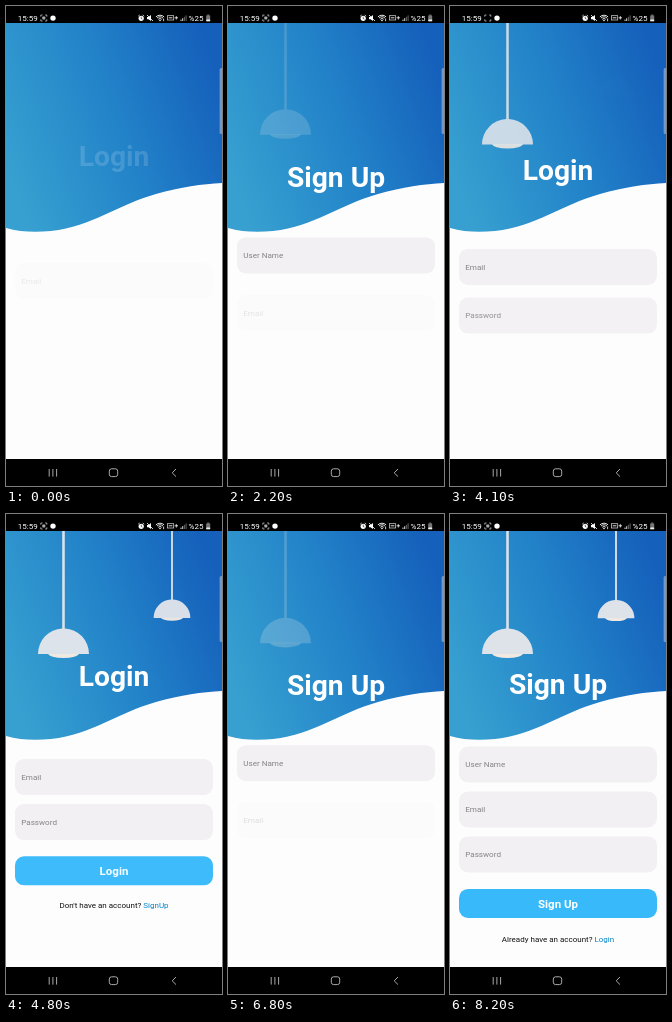
An HTML page with a canvas for the animation above (8.3 s loop, 216 by 480 pixels).

```html
<!DOCTYPE html>
<html lang="en">
<head>
<meta charset="utf-8">
<title>Login and sign up</title>
<style>
  html, body { margin: 0; width: 100%; height: 100%; overflow: hidden; background: #000; }
  canvas { display: block; width: 216px; height: 480px; }
</style>
</head>
<body>
<canvas id="stage"></canvas>
<script>
const W = 216, H = 480, LOOP = 8300, STEP = 100;
const FONT = 'Roboto, Arial, sans-serif';
const canvas = document.getElementById('stage');
const dpr = window.devicePixelRatio || 1;
canvas.width = W * dpr;
canvas.height = H * dpr;
const ctx = canvas.getContext('2d');
ctx.scale(dpr, dpr);

const PAGES = {
  login: {
    title: 'Login', titleY: 172, fieldTop: 245, fields: ['Email', 'Password'],
    buttonTop: 342, noteY: 395.3, note: "Don't have an account? ", link: 'SignUp'
  },
  signUp: {
    title: 'Sign Up', titleY: 180, fieldTop: 232.5, fields: ['User Name', 'Email', 'Password'],
    buttonTop: 375, noteY: 428.3, note: 'Already have an account? ', link: 'Login'
  }
};

// When each page is shown and when its entrance begins
const VISITS = [
  { shown: 0, start: -62, page: PAGES.login },
  { shown: 1900, start: 1930, page: PAGES.signUp },
  { shown: 3700, start: 3690, page: PAGES.login },
  { shown: 6500, start: 6520, page: PAGES.signUp }
];

// Underdamped spring: stiffness 100, damping 10, mass 1
function spring(ms) {
  if (ms <= 0) return 0;
  const t = ms / 1000, a = Math.sqrt(75) * t;
  return 1 - Math.exp(-5 * t) * (Math.cos(a) + Math.sin(a) * 5 / Math.sqrt(75));
}

// Fade in while sliding; dir -1 comes from above, 1 from below
function enter(ms, dir, draw) {
  const x = spring(ms);
  if (x <= 0) return;
  ctx.save();
  ctx.globalAlpha = Math.min(1, x);
  ctx.translate(0, dir * 14 * (1 - x));
  draw();
  ctx.restore();
}

function text(str, x, y, size, color, weight = 400, align = 'left') {
  ctx.font = `${weight} ${size}px ${FONT}`;
  ctx.fillStyle = color;
  ctx.textAlign = align;
  ctx.fillText(str, x, y);
}

function box(x, y, w, h, r, color) {
  ctx.fillStyle = color;
  ctx.beginPath();
  ctx.roundRect(x, y, w, h, r);
  ctx.fill();
}

function disc(x, y, r, color) {
  ctx.fillStyle = color;
  ctx.beginPath();
  ctx.arc(x, y, r, 0, Math.PI * 2);
  ctx.fill();
}

function line(points, color = '#fff', width = 0.8) {
  ctx.strokeStyle = color;
  ctx.lineWidth = width;
  ctx.beginPath();
  points.forEach(([x, y], i) => i ? ctx.lineTo(x, y) : ctx.moveTo(x, y));
  ctx.stroke();
}

function shape(points, color) {
  ctx.fillStyle = color;
  ctx.beginPath();
  points.forEach(([x, y]) => ctx.lineTo(x, y));
  ctx.fill();
}

function background() {
  ctx.fillStyle = '#fefdfe';
  ctx.fillRect(0, 0, W, H);
  const g = ctx.createLinearGradient(0, 160, 216, 80);
  g.addColorStop(0, '#37a0d0');
  g.addColorStop(0.5, '#2384c9');
  g.addColorStop(1, '#1560bb');
  ctx.fillStyle = g;
  ctx.beginPath();
  ctx.moveTo(0, 17);
  ctx.lineTo(0, 222);
  ctx.bezierCurveTo(14, 226, 29, 226.5, 45, 225);
  ctx.bezierCurveTo(87, 220, 111, 199, 150, 188);
  ctx.bezierCurveTo(175, 181, 196, 178, 216, 177);
  ctx.lineTo(216, 17);
  ctx.fill();
}

function lamp(x, y, r) {
  const cord = r * 0.1;
  ctx.fillStyle = '#f0e9e2';
  ctx.beginPath();
  ctx.ellipse(x, y - 0.5, r * 0.6, r * 0.18, 0, 0, Math.PI);
  ctx.fill();
  // One path, so cord and dome fade as a single piece
  ctx.fillStyle = '#dee3ea';
  ctx.beginPath();
  ctx.moveTo(x - cord / 2, -20);
  ctx.lineTo(x - cord / 2, y - r);
  ctx.arc(x, y, r, -Math.PI / 2 - 0.05, -Math.PI, true);
  ctx.lineTo(x + r, y);
  ctx.arc(x, y, r, 0, -Math.PI / 2 + 0.05, true);
  ctx.lineTo(x + cord / 2, -20);
  ctx.fill();
}

function drawPage(page, ms) {
  enter(ms - 200, -1, () => lamp(57.5, 140, 25.5));
  enter(ms - 400, -1, () => lamp(166, 104.3, 18.4));
  enter(ms, -1, () => text(page.title, 108, page.titleY, 28.2, '#fff', 700, 'center'));

  page.fields.forEach((label, i) => enter(ms - i * 200, 1, () => {
    const y = page.fieldTop + i * 45;
    box(9, y, 198, 36, 9, '#f2f0f2');
    text(label, 15.2, y + 20.9, 8.1, '#858486');
  }));

  const wait = page.fields.length * 200;
  enter(ms - wait, 1, () => {
    box(9, page.buttonTop, 198, 29, 9, '#38bafa');
    text(page.link === 'SignUp' ? 'Login' : 'Sign Up', 108, page.buttonTop + 18.7, 11.5, '#fff', 700, 'center');
  });
  enter(ms - wait - 200, 1, () => {
    ctx.font = `400 8px ${FONT}`;
    const noteW = ctx.measureText(page.note).width;
    const left = 108 - (noteW + ctx.measureText(page.link).width) / 2;
    text(page.note, left, page.noteY, 8, '#111');
    text(page.link, left + noteW, page.noteY, 8, '#0284c7');
  });
}

function arcLine(x, y, r, from, to, color, width) {
  ctx.strokeStyle = color;
  ctx.lineWidth = width;
  ctx.beginPath();
  ctx.arc(x, y, r, from, to);
  ctx.stroke();
}

function statusBar(ms) {
  ctx.fillStyle = '#000';
  ctx.fillRect(0, 0, W, 17);
  text('15:59', 11.7, 14.8, 8, '#fff');

  // Capture corners with a blinking centre
  for (const sx of [-1, 1]) for (const sy of [-1, 1]) {
    const x = 37.8 + sx * 3, y = 12 + sy * 3;
    line([[x - sx * 1.7, y], [x, y], [x, y - sy * 1.7]], '#ddd', 0.7);
  }
  if (ms % 1600 < 800) box(36.3, 10.6, 3, 2.8, 0.6, '#aaa');
  disc(47, 12.1, 2.7, '#fff');

  // Alarm
  disc(135.2, 12.3, 2.6, '#fff');
  line([[135.2, 10.7], [135.2, 12.5], [136.4, 13.1]], '#000', 0.6);
  line([[132.2, 10.2], [133.7, 9]]);
  line([[136.7, 9], [138.2, 10.2]]);

  // Muted speaker
  shape([[141, 10.9], [142.5, 10.9], [145, 9], [145, 15], [142.5, 13.2], [141, 13.2]], '#fff');
  line([[141, 9], [147, 15]]);

  // Wi-Fi
  for (const r of [2.4, 4.2, 5.8]) arcLine(154, 15, r, -Math.PI * 0.75, -Math.PI * 0.25, '#fff', 0.9);
  disc(154, 14.5, 0.8, '#fff');
  line([[157.6, 12.5], [157.6, 15.2]], '#fff', 0.8);

  // Call badge
  ctx.strokeStyle = '#ddd';
  ctx.lineWidth = 0.7;
  ctx.strokeRect(161.4, 9.7, 6.3, 4.3);
  line([[162.7, 11.8], [166.4, 11.8]], '#ddd', 1);
  line([[168.6, 11.8], [172, 11.8]], '#fff', 0.8);
  line([[170.3, 10.1], [170.3, 13.5]], '#fff', 0.8);

  for (let i = 0; i < 4; i++) {
    ctx.fillStyle = i < 2 ? '#ddd' : '#666';
    ctx.fillRect(174.5 + i * 1.7, 13.6 - i * 1.4, 1, 1.4 + i * 1.4);
  }
  text('%25', 182.6, 14.8, 8, '#fff');
  box(200.2, 9.3, 4, 6, 0.8, '#777');
  box(201.3, 8.5, 1.8, 1, 0.2, '#777');
  box(200.2, 13.4, 4, 1.9, 0.6, '#eee');
}

function navBar() {
  ctx.fillStyle = '#000';
  ctx.fillRect(0, 453, W, 27);
  for (const x of [43.2, 46.9, 50.6]) line([[x, 463], [x, 470.6]], '#bbb', 0.9);
  ctx.strokeStyle = '#bbb';
  ctx.lineWidth = 0.9;
  ctx.beginPath();
  ctx.roundRect(103.3, 462.8, 8.4, 7.8, 2.3);
  ctx.stroke();
  line([[170, 463], [166.2, 466.8], [170, 470.6]], '#bbb', 0.9);
}

function draw(ms) {
  const visit = VISITS.filter(v => ms >= v.shown).pop();
  background();
  drawPage(visit.page, ms - visit.start);
  if (ms < 800 || ms >= 1600) box(213.6, 62, 4, 66, 1.5, 'rgba(185,197,213,0.55)');
  statusBar(ms);
  navBar();
}

const begin = performance.now();
function tick() {
  const ms = Math.max(0, performance.now() - begin) % LOOP;
  draw(Math.floor(ms / STEP) * STEP);
  requestAnimationFrame(tick);
}
tick();
</script>
</body>
</html>
```
